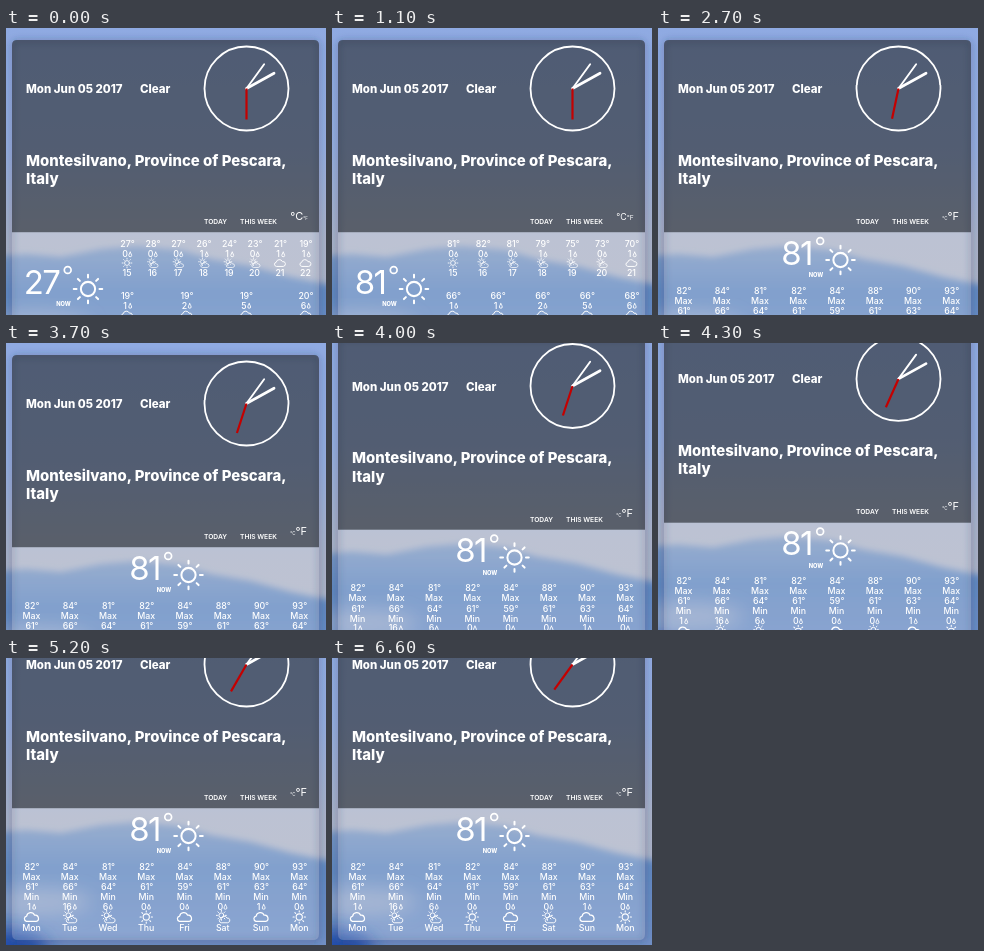
Recreate the animation shown at these times as an HTML page. Size 320x287 px, loop 6.7 s.

```html
<!DOCTYPE html>
<html lang="en">
<head>
<meta charset="utf-8">
<title>Weather</title>
<style>
  html, body { margin: 0; width: 100%; height: 100%; overflow: hidden; background: #6f90cb; }
  svg { display: block; width: 320px; height: 287px; }
  text { font-family: Inter, "Open Sans", sans-serif; fill: #fff; }
  .bold { font-weight: 800; }
  .menu { font-size: 6.7px; font-weight: 600; }
  .cell { font-size: 8.8px; font-weight: 500; text-anchor: middle; }
  .line { fill: none; stroke: #fff; stroke-linecap: round; stroke-linejoin: round; }
</style>
</head>
<body>
<svg viewBox="0 0 320 287">
  <defs>
    <linearGradient id="sky" x2="0" y2="1">
      <stop offset="0" stop-color="#8faae2"/>
      <stop offset=".35" stop-color="#97aede"/>
      <stop offset=".62" stop-color="#abb3c8"/>
      <stop offset="1" stop-color="#b0b4c4"/>
    </linearGradient>
    <linearGradient id="hills" x2="0" y2="1">
      <stop offset="0" stop-color="#7d98c2"/>
      <stop offset=".3" stop-color="#6288c0"/>
      <stop offset="1" stop-color="#7592c8"/>
    </linearGradient>
    <filter id="soft" x="-20%" y="-20%" width="140%" height="140%"><feGaussianBlur stdDeviation="3"/></filter>
    <filter id="haze" x="-50%" y="-50%" width="200%" height="200%"><feGaussianBlur stdDeviation="9"/></filter>
  </defs>
  <g id="page">
    <rect width="320" height="341" fill="url(#sky)"/>
    <path d="M-20 229 L20 226 L55 229 L95 221 L130 218 L175 222 L205 231 L245 238 L285 249 L340 260 V370 H-20Z" fill="url(#hills)" filter="url(#soft)"/>
    <ellipse cx="30" cy="298" rx="55" ry="14" fill="#b4bbd0" fill-opacity=".5" filter="url(#haze)"/>
    <ellipse cx="0" cy="345" rx="42" ry="18" fill="#1d48a8" filter="url(#haze)"/>
    <rect x="6" y="13" width="307" height="324" rx="6" fill="none" stroke="#23395f" stroke-opacity=".4" stroke-width="3" filter="url(#soft)"/>
    <path d="M6 204.2 V17 Q6 12 11 12 H308 Q313 12 313 17 V204.2Z" fill="#25282c" fill-opacity=".6"/>
    <path d="M6 204.2 H313 V330 Q313 336 307 336 H12 Q6 336 6 330Z" fill="#fff" fill-opacity=".2"/>

    <text class="bold" x="20" y="65" font-size="11.5">Mon Jun 05 2017</text>
    <text class="bold" x="134" y="65" font-size="11.5">Clear</text>
    <text class="bold" font-size="14.9"><tspan x="20" y="137.5">Montesilvano, Province of Pescara,</tspan><tspan x="20" y="156">Italy</tspan></text>
    <text class="menu" x="198" y="196">TODAY</text>
    <text class="menu" x="234" y="196">THIS WEEK</text>
    <text x="284.3" y="191.7"><tspan id="celsius">°C</tspan><tspan id="fahrenheit">°F</tspan></text>

    <g class="line" transform="translate(240.5 60.5)">
      <circle r="42" stroke-width="1.8"/>
      <path d="M0 0V-30" stroke-width="1.9" transform="rotate(36)"/>
      <path d="M0 0V-31.5" stroke-width="2.7" transform="rotate(61)"/>
      <path id="second" d="M0 0V-31" stroke="#c40000" stroke-width="2.2" stroke-linecap="butt"/>
    </g>

    <g id="now">
      <text id="temp" x="53.5" y="265.8" font-size="33" font-weight="400" text-anchor="end" letter-spacing="-1.5"></text>
      <circle class="line" cx="61.7" cy="242" r="3.4" stroke-width="1.7"/>
      <g id="bigSun" transform="translate(82 261) scale(3.1)"></g>
      <text class="bold" x="57.5" y="278.3" font-size="5.7" text-anchor="middle">NOW</text>
    </g>
    <g id="dayC"></g>
    <g id="dayF"></g>
    <g id="week"></g>
  </g>
</svg>
<script>
const $ = id => document.getElementById(id);
const LOOP = 6700, UNIT_AT = 1000, WEEK_AT = 2500;

const rays = (n, r0, r1) => Array.from({ length: n }, (_, i) => {
  const a = i * 2 * Math.PI / n, c = Math.cos(a), s = Math.sin(a);
  return `M${c * r0} ${s * r0}L${c * r1} ${s * r1}`;
}).join("");
const sun = w => `<path class="line" stroke-width="${w}" d="M2.3 0A2.3 2.3 0 1 1 -2.3 0A2.3 2.3 0 1 1 2.3 0${rays(8, 3.7, 4.6)}"/>`;
const cloud = `<path class="line" stroke-width=".9" d="M-3.8 3.2A2 2 0 0 1 -3.6 -.7A3.1 3.1 0 0 1 2.3 -1.3A2.3 2.3 0 0 1 3.4 3.2Z"/>`;
const icons = {
  s: sun(.8),
  c: cloud,
  p: `<g transform="translate(-1 -1.2) scale(.8)">${sun(.9)}</g><g transform="translate(1.4 1.8) scale(.75)">${cloud}</g>`
};

const label = (x, y, s) => `<text class="cell" x="${x}" y="${y}">${s}</text>`;
const icon = (x, y, kind, size) => `<g transform="translate(${x} ${y}) scale(${size})">${icons[kind]}</g>`;
const rain = (x, y, n) => label(x - 2, y, n) +
  `<path class="line" stroke-width=".9" transform="translate(${x + .8 + 2.4 * String(n).length} ${y - 2.6})" d="M0 -2.2Q3 2.3 0 2.3T0 -2.2Z"/>`;

const hours = [15, 16, 17, 18, 19, 20, 21, 22, 23, 0, 1, 2];
const celsius = [27, 28, 27, 26, 24, 23, 21, 19, 19, 19, 19, 20];
const hourRain = [0, 0, 0, 1, 1, 0, 1, 1, 1, 2, 5, 6];
const toF = c => Math.round(c * 1.8 + 32);

// Wraps the twelve hours after `first` cells and spreads each row evenly.
function hourly(first, convert) {
  return hours.map((h, i) => {
    const row = i < first ? 0 : 1;
    const k = row ? i - first : i, n = row ? hours.length - first : first;
    const x = 121 + 178.5 * k / (n - 1), y = 219 + row * 51.5;
    return label(x + .5, y, convert(celsius[i]) + "°") + rain(x, y + 10, hourRain[i]) +
      icon(x, y + 16, "sppppp"[i] || "c", 1.05) + label(x, y + 28.5, h);
  }).join("");
}

const days = ["Mon", "Tue", "Wed", "Thu", "Fri", "Sat", "Sun", "Mon"];
const maxT = [82, 84, 81, 82, 84, 88, 90, 93];
const minT = [61, 66, 64, 61, 59, 61, 63, 64];
const dayRain = [1, 16, 6, 0, 0, 0, 1, 0];

$("bigSun").innerHTML = sun(.65);
$("dayC").innerHTML = hourly(8, c => c);
$("dayF").innerHTML = hourly(7, toF);
$("week").innerHTML = days.map((d, i) => {
  const x = 25.5 + 38.25 * i;
  return label(x + .5, 265.7, maxT[i] + "°") + label(x, 275.8, "Max") + label(x + .5, 286, minT[i] + "°") +
    label(x, 296, "Min") + rain(x - .5, 305.5, dayRain[i]) + icon(x, 313, "cppscpcs"[i], 1.35) + label(x, 327, d);
}).join("");

const scrollKeys = [[3700, 0], [4000, 17.5], [4700, 34], [5200, 54]];
function scrollAt(t) {
  let [t0, y0] = scrollKeys[0];
  for (const [t1, y1] of scrollKeys) {
    if (t < t1) return t < t0 ? y0 : y0 + (y1 - y0) * (t - t0) / (t1 - t0);
    [t0, y0] = [t1, y1];
  }
  return y0;
}

const show = (id, on) => $(id).setAttribute("display", on ? "inline" : "none");

function draw() {
  const t = Math.floor(performance.now() % LOOP / 100) * 100;
  const metric = t < UNIT_AT, weekly = t >= WEEK_AT;
  const swap = Math.min(1, Math.max(0, (t - UNIT_AT) / 300));
  const seconds = 30 + Math.max(0, Math.floor((t - 200) / 1000));

  $("page").setAttribute("transform", `translate(0 ${-scrollAt(t)})`);
  $("second").setAttribute("transform", `rotate(${seconds * 6})`);
  $("celsius").setAttribute("font-size", 11 - 6.5 * swap);
  $("fahrenheit").setAttribute("font-size", 4.5 + 6.5 * swap);
  $("temp").textContent = metric ? 27 : 81;
  $("now").setAttribute("transform", weekly ? "translate(100.5 -29)" : "");
  show("dayC", metric);
  show("dayF", !metric && !weekly);
  show("week", weekly);
  requestAnimationFrame(draw);
}
draw();
</script>
</body>
</html>
```
